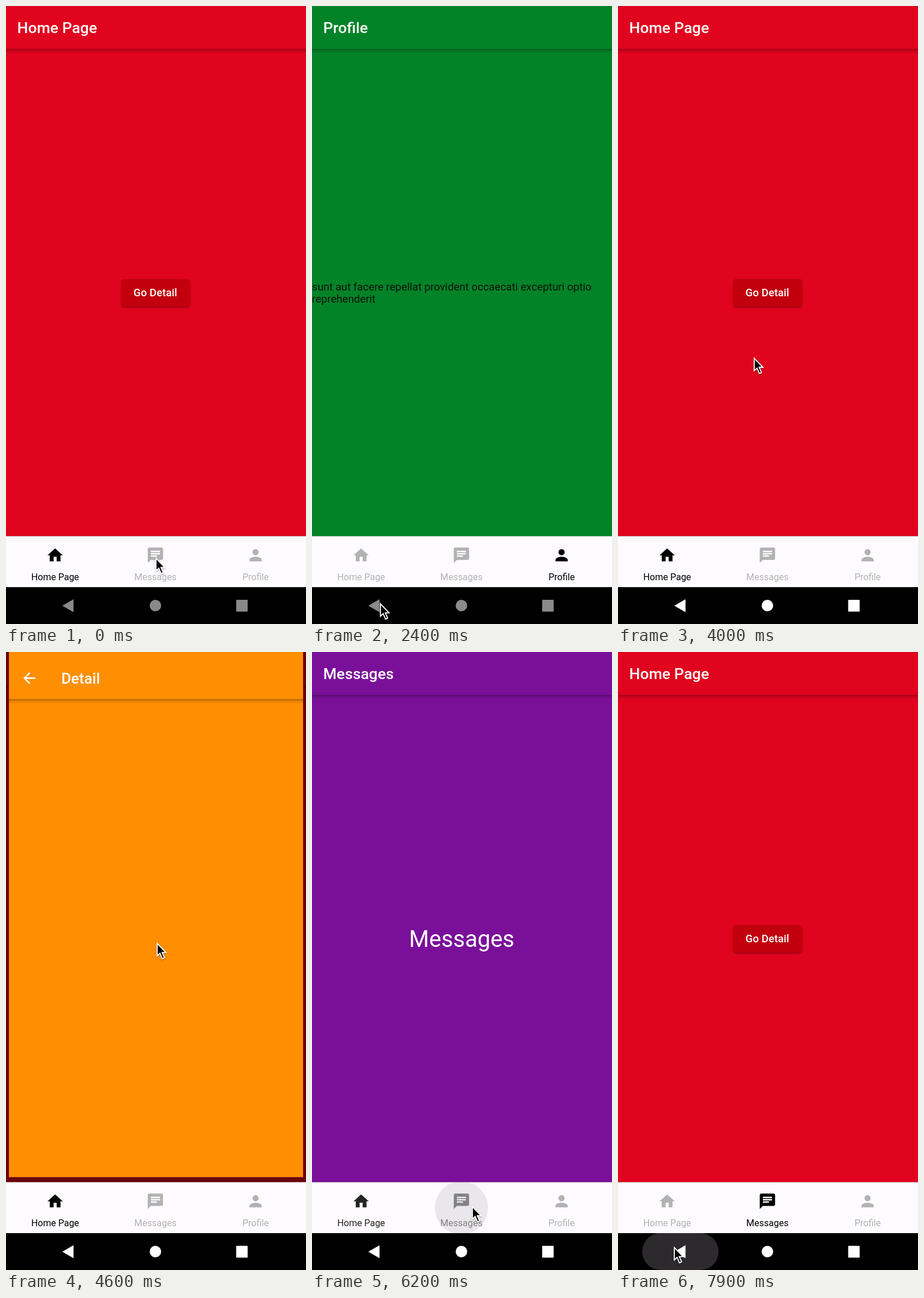
Write an HTML page that moves like this. It is 522 px wide and 1073 px high and loops after 8 s.

```html
<!DOCTYPE html>
<html lang="en">
<head>
<meta charset="utf-8">
<title>Tab navigation</title>
<style>
  html, body { margin: 0; width: 100%; height: 100%; overflow: hidden; background: #000; }
  svg { display: block; width: 100%; height: 100%; font-family: Roboto, sans-serif; }
  .title { font-size: 26.67px; font-weight: 500; fill: #fff; }
  .mid { text-anchor: middle; }
  .label { font-size: 16px; }
  .body { font-size: 18.67px; }
</style>
</head>
<body>
<svg viewBox="0 0 522 1073">
  <defs>
    <linearGradient id="shade" x2="0" y2="1">
      <stop offset="0" stop-opacity=".3"/>
      <stop offset=".4" stop-opacity=".13"/>
      <stop offset="1" stop-opacity="0"/>
    </linearGradient>
    <filter id="soft" x="-20%" y="-30%" width="140%" height="170%">
      <feDropShadow dx="0" dy="2" stdDeviation="1.6" flood-opacity=".3"/>
    </filter>
    <filter id="cursorShade" x="-40%" y="-30%" width="200%" height="180%">
      <feDropShadow dx="0" dy="1.5" stdDeviation="1.2" flood-opacity=".35"/>
    </filter>
    <clipPath id="pageClip"><path d="M0 0H522V920.5H0z"/></clipPath>
    <clipPath id="tabClip"><path d="M0 920.5H522V1009H0z"/></clipPath>
  </defs>

  <g clip-path="url(#pageClip)">
    <g id="home">
      <path d="M0-32H522V921H0z" fill="#e0041e"/>
      <rect y="74.5" width="522" height="8" fill="url(#shade)"/>
      <text class="title" x="19.5" y="47">Home Page</text>
      <rect x="200.5" y="474" width="120" height="48" rx="5" fill="#c20009" filter="url(#soft)"/>
      <text class="mid body" x="259.8" y="504" font-weight="500" fill="#fff">Go Detail</text>
    </g>
    <g id="messages">
      <path d="M0-32H522V921H0z" fill="#7a109a"/>
      <rect y="74.5" width="522" height="8" fill="url(#shade)"/>
      <text class="title" x="19.5" y="47">Messages</text>
      <text class="mid" x="260.5" y="512" font-size="40" fill="#fff">Messages</text>
    </g>
    <g id="profile">
      <path d="M0-32H522V921H0z" fill="#028328"/>
      <rect y="74.5" width="522" height="8" fill="url(#shade)"/>
      <text class="title" x="19.5" y="47">Profile</text>
      <text class="body" y="494" fill="#0b130d">sunt aut facere repellat provident occaecati excepturi optio</text>
      <text class="body" y="515" fill="#0b130d">reprehenderit</text>
    </g>
    <path id="scrim" d="M0 0H522V921H0z"/>
    <g id="detail">
      <path d="M0-32H522V921H0z" fill="#ff8f00"/>
      <rect y="74.5" width="522" height="8" fill="url(#shade)"/>
      <path transform="translate(20.3 21.5) scale(1.333)" fill="#fff"
        d="M20 11H7.83l5.59-5.59L12 4l-8 8 8 8 1.41-1.41L7.83 13H20v-2z"/>
      <text class="title" x="93" y="47">Detail</text>
    </g>
  </g>

  <path d="M0 920.5H522V1009H0z" fill="#fdfbff"/>
  <g id="tabs"></g>
  <circle id="splash" cy="965" clip-path="url(#tabClip)"/>

  <path d="M0 1009H522V1073H0z"/>
  <g id="presses"></g>
  <g id="keys">
    <path d="M98 1041.2L117.5 1030V1052.4z"/>
    <circle cx="260" cy="1041" r="10"/>
    <rect x="400.5" y="1031" width="20" height="20.5" rx="1"/>
  </g>
  <path id="cursor" d="M1 1V22.4L5.9 18L10 27.5L13.6 25.9L9.6 16.6H16.2z" stroke="#fff" stroke-width="1.8"
    filter="url(#cursorShade)"/>
</svg>
<script>
const LOOP = 8000, STEP = 100;
const $ = id => document.getElementById(id);
const clamp = v => Math.min(1, Math.max(0, v));
const decel = (t, power) => 1 - (1 - clamp(t)) ** power;
const smooth = t => t * t * (3 - 2 * t);

const pages = ['home', 'messages', 'profile'];
const tabs = [
  { x: 85.5, label: 'Home Page', icon: 'M10 20v-6h4v6h5v-8h3L12 3 2 12h3v8z' },
  { x: 260, label: 'Messages', icon: 'M20 2H4c-1.1 0-2 .9-2 2v18l4-4h14c1.1 0 2-.9 2-2V4c0-1.1-.9-2-2-2zM6 9h12v2H6V9zm8 5H6v-2h8v2zm4-6H6V6h12v2z' },
  { x: 434.3, label: 'Profile', icon: 'M12 12c2.21 0 4-1.79 4-4s-1.79-4-4-4-4 1.79-4 4 1.79 4 4 4zm0 2c-2.67 0-8 1.34-8 4v2h16v-2c0-2.66-5.33-4-8-4z' }
];
// time, page index, opened by tapping its tab
const visits = [
  [-999, 0], [460, 1, true], [1560, 2, true], [2760, 1], [3460, 0],
  [6160, 1, true], [6560, 2, true], [7560, 1], [7900, 0]
];
// back key: down, up
const presses = [[2600, 2760], [3260, 3460], [5400, 5540], [7300, 7560], [7600, 7900]];
const detailOpen = 4480, detailClose = 5540;
// time, x, y of the pointer tip
const pointer = [
  [0, 260, 958], [700, 260, 958], [1300, 434, 957], [1700, 434, 957],
  [2250, 118, 1037], [2800, 118, 1037], [3200, 131, 1038], [3500, 131, 1038],
  [4200, 262, 505], [4700, 262, 505], [5300, 110, 1036], [5600, 110, 1036],
  [6050, 278, 962], [6230, 278, 962], [6500, 436, 962], [6650, 436, 962],
  [7100, 97, 1033], [LOOP, 97, 1033]
];

$('tabs').innerHTML = tabs.map(({ x, label, icon }) => `<g>
  <path transform="translate(${x - 16} 937.7) scale(1.333)" d="${icon}"/>
  <text class="mid label" x="${x}" y="997">${label}</text></g>`).join('');
$('presses').innerHTML = presses.map(() => '<rect y="1009" height="64" fill="#2c2a2d"/>').join('');

function show(id, opacity, scale = 1) {
  const node = $(id);
  node.style.display = opacity > 0 ? '' : 'none';
  node.setAttribute('opacity', opacity);
  node.setAttribute('transform', `translate(261 444) scale(${scale}) translate(-261 -444)`);
}

function drawPages(t, current) {
  const closing = t >= detailClose;
  const p = clamp((t - (closing ? detailClose : detailOpen)) / 300);
  const zoom = decel(p, 4);
  const homeScale = closing ? 1.05 - .05 * zoom : 1 + .05 * zoom;
  pages.forEach((id, i) => show(id, i === current ? 1 : 0, i ? 1 : homeScale));
  show('detail',
    closing ? 1 - clamp((p - .08) / .125) : clamp((p - .125) / .125),
    closing ? 1 - .1 * zoom : .85 + .15 * zoom);
  show('scrim', closing ? 0 : .53 * clamp((p - .2) / .2));
}

function drawTabs(t, index) {
  const [time, current, tapped] = visits[index];
  const previous = index ? visits[index - 1][1] : current;
  const p = clamp((t - time) / 200);
  [...$('tabs').children].forEach((tab, i) => {
    const active = i === current ? p : i === previous ? 1 - p : 0;
    const grey = Math.round(178 * (1 - active));
    tab.setAttribute('fill', `rgb(${grey},${grey},${grey})`);
  });
  const age = t - time;
  const splash = $('splash');
  splash.setAttribute('cx', tabs[current].x);
  splash.setAttribute('r', 40 + 22 * decel(age / 300, 2.3));
  splash.setAttribute('opacity', tapped ? .08 * (1 - clamp((age - 40) / 300)) : 0);
}

function drawKeys(t) {
  $('keys').setAttribute('fill', t < presses[0][0] ? '#8b898c' : '#fff');
  presses.forEach(([down, up], i) => {
    const rect = $('presses').children[i];
    const width = 133 * decel((t - down) / 350, 3.5);
    rect.setAttribute('x', 108.6 - width / 2);
    rect.setAttribute('width', width);
    rect.setAttribute('rx', Math.min(32, width / 2));
    rect.setAttribute('opacity', t < down ? 0 : 1 - clamp((t - up) / 300));
  });
}

function drawCursor(t) {
  const next = pointer.findIndex(([time]) => time > t);
  const [t0, x0, y0] = pointer[next - 1], [t1, x1, y1] = pointer[next];
  const p = smooth((t - t0) / (t1 - t0));
  $('cursor').setAttribute('transform', `translate(${x0 + (x1 - x0) * p} ${y0 + (y1 - y0) * p})`);
}

function draw(t) {
  const index = visits.filter(([time]) => time <= t).length - 1;
  drawPages(t, visits[index][1]);
  drawTabs(t, index);
  drawKeys(t);
  drawCursor(t);
}

let start;
function frame(now) {
  start ??= now;
  draw(Math.floor(((now - start) % LOOP) / STEP) * STEP);
  requestAnimationFrame(frame);
}
draw(0);
requestAnimationFrame(frame);
</script>
</body>
</html>
```
